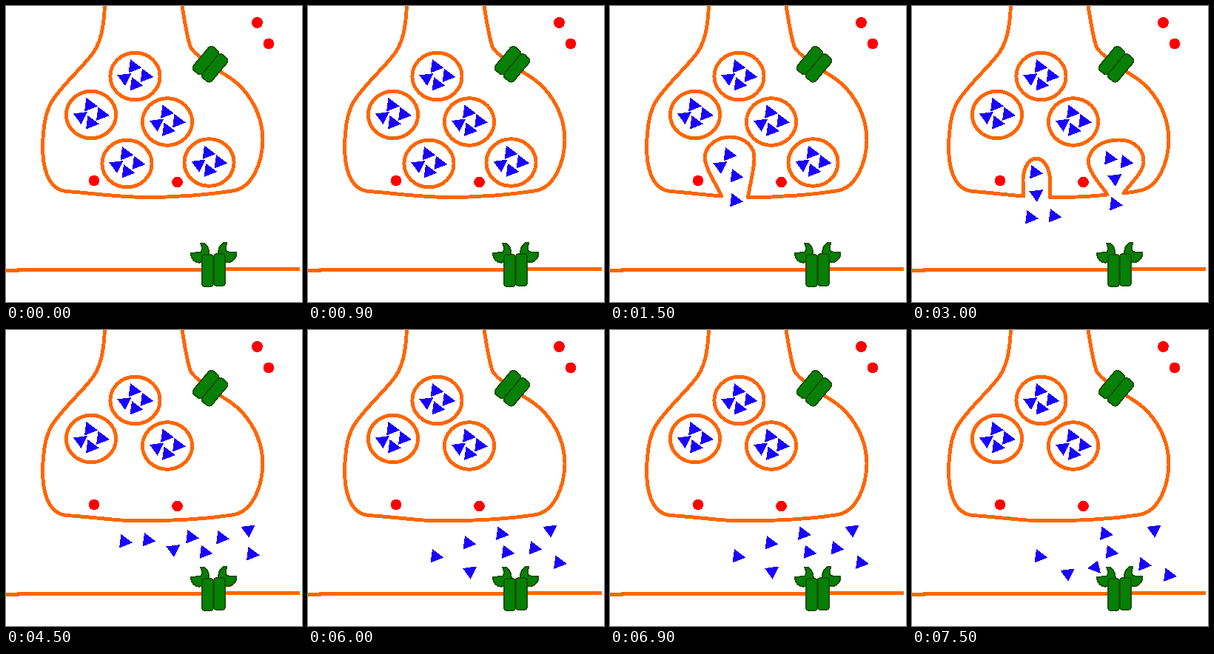
Write an HTML page that moves like this. It is 400 px wide and 400 px high and loops after 9000 ms.

```html
<!DOCTYPE html>
<html lang="en">
<head>
<meta charset="utf-8">
<title>Synapse</title>
<style>
  html, body { margin: 0; width: 100%; height: 100%; overflow: hidden; background: #fff; }
  svg { display: block; width: 100%; height: 100%; shape-rendering: crispEdges; }
  .membrane { fill: none; stroke: #f60; stroke-width: 4.9; stroke-linecap: round; stroke-linejoin: round; }
  .target-cell { stroke-linecap: butt; }
  .protein { fill: #068006; stroke: #1a5200; stroke-width: 2; stroke-linejoin: round; }
  .ion { fill: #f00; }
  .signal { fill: #1a00ff; }

  .step { visibility: hidden; animation: show 9s step-end infinite; animation-delay: calc((var(--i) - 6) * 1.5s); }
  @keyframes show {
    0% { visibility: visible; }
    16.6666%, 100% { visibility: hidden; }
  }
</style>
</head>
<body>
<svg viewBox="0 0 400 400">
  <defs>
    <path id="r" class="signal" d="M-6-9.5 9.5 2 -8.5 9Z"/>
    <path id="d" class="signal" d="M-9.5-5 9.5-7.5 1 9.5Z"/>
    <path id="l" class="signal" d="M-10 2 4-8.5 8 9Z"/>
    <g id="vesicle">
      <ellipse class="membrane" rx="33.6" ry="31.8"/>
      <use href="#r" x="-.5" y="-13.5"/>
      <use href="#r" x="15.5" y="-1"/>
      <use href="#d" x="-14.5" y="3.5"/>
      <use href="#r" x="1.5" y="10.5"/>
    </g>
    <path id="floor" class="membrane" d="M82 250.5C105 252 125 254.5 155 257Q190 258.5 225 257C255 256 285 253 305 250"/>
    <path id="claw" class="protein" d="M263 321Q269 319 273 327Q277 337 271 343Q264 348 257 346Q250 342 250 334L263 333Q267 328 263 321Z"/>
    <rect id="bar" class="protein" x="-7.7" y="-21.5" width="15.4" height="43" rx="4"/>
  </defs>

  <g class="membrane">
    <path d="M133.5 0C132 27 129 46 119 61.5C106 81 76 106 62 129C52 146 51 165 49.5 185C49 215 55 248 82 250.5"/>
    <path d="M238 0C242 25 245 45 250 57C258 67 274 79 290 89C302 96 311 102 319 111C337 131 347 154 347 182C346 212 333 247 305 250"/>
    <path class="target-cell" d="M0 357.5H17V356.5H264M297 355.5H397"/>
  </g>

  <g transform="translate(276 78.7) rotate(40)">
    <rect class="protein" x="-16" y="-20.5" width="16" height="41" rx="5"/>
    <rect class="protein" y="-20.5" width="16" height="41" rx="5"/>
  </g>
  <use href="#claw"/>
  <use href="#claw" transform="translate(561.5 -.7) scale(-1 1)"/>
  <use href="#bar" x="272.5" y="357.5"/>
  <use href="#bar" x="288.5" y="356.5"/>

  <g class="ion">
    <circle cx="339.5" cy="22.5" r="7.4"/>
    <circle cx="355" cy="51" r="7.4"/>
    <circle cx="119" cy="236" r="7.4"/>
    <circle cx="231.5" cy="238" r="7.4"/>
  </g>

  <use href="#vesicle" x="174.5" y="95"/>
  <use href="#vesicle" x="115" y="147"/>
  <use href="#vesicle" x="218" y="156.5"/>

  <g class="step" style="--i:0">
    <path class="membrane" d="M82 250.5C105 252 125 255 155 257Q195 260 235 257C260 256 285 253 305 250"/>
    <use href="#vesicle" x="163.5" y="213"/>
    <use href="#vesicle" x="274.5" y="211.5"/>
  </g>

  <g class="step" style="--i:1">
    <path class="membrane" d="M82 250.5C105 252 125 255 151 257C143 240 131 224 128 206C128 188 146 177 162 177C182 177 196 190 195 207C194 226 189 241 186.5 258.5Q210 259 235 257C260 256 285 253 305 250"/>
    <use href="#vesicle" x="274.5" y="211.5"/>
    <use href="#r" x="162" y="200.5"/>
    <use href="#d" x="149" y="217.5"/>
    <use href="#r" x="171" y="229.5"/>
    <use href="#r" x="170.5" y="262.5"/>
  </g>

  <g class="step" style="--i:2">
    <path class="membrane" d="M82 250.5C105 252 125 255 151 257L150 235C151 216 159 206 168 206C179 206 186.5 221 186.5 236V258.5Q230 259 264 255C257 243 240 228 238 210C240 191 258 181 280 181C304 181 314 198 313 212C311 227 294 241 286 253Q296 252 305 250"/>
    <use href="#r" x="167.5" y="224.5"/>
    <use href="#d" x="168" y="255.5"/>
    <use href="#r" x="161.5" y="285.5"/>
    <use href="#r" x="193" y="283.5"/>
    <use href="#r" x="268.5" y="205.5"/>
    <use href="#r" x="290" y="210.5"/>
    <use href="#d" x="274" y="234.5"/>
    <use href="#r" x="275.5" y="267.5"/>
  </g>

  <g class="step" style="--i:3">
    <use href="#floor"/>
    <use href="#r" x="161.5" y="285.5"/>
    <use href="#r" x="193" y="283.5"/>
    <use href="#d" x="226" y="297.5"/>
    <use href="#r" x="251.5" y="279.5"/>
    <use href="#r" x="270" y="300"/>
    <use href="#r" x="292.5" y="280.5"/>
    <use href="#d" x="327" y="271"/>
    <use href="#r" x="333.5" y="302.5"/>
  </g>

  <g class="step" style="--i:4">
    <use href="#floor"/>
    <use href="#r" x="174" y="305.5"/>
    <use href="#r" x="218" y="287.5"/>
    <use href="#d" x="218.5" y="327"/>
    <use href="#r" x="262.5" y="275"/>
    <use href="#r" x="270" y="300"/>
    <use href="#r" x="307" y="294.5"/>
    <use href="#d" x="327" y="271"/>
    <use href="#r" x="340.5" y="314"/>
  </g>

  <g class="step" style="--i:5">
    <use href="#floor"/>
    <use href="#r" x="174" y="305.5"/>
    <use href="#d" x="210" y="330"/>
    <use href="#l" x="247" y="320"/>
    <use href="#r" x="262.5" y="275"/>
    <use href="#r" x="270" y="300"/>
    <use href="#r" x="314.5" y="316.5"/>
    <use href="#d" x="327" y="271"/>
    <use href="#r" x="348.5" y="331"/>
  </g>
</svg>
</body>
</html>
```
